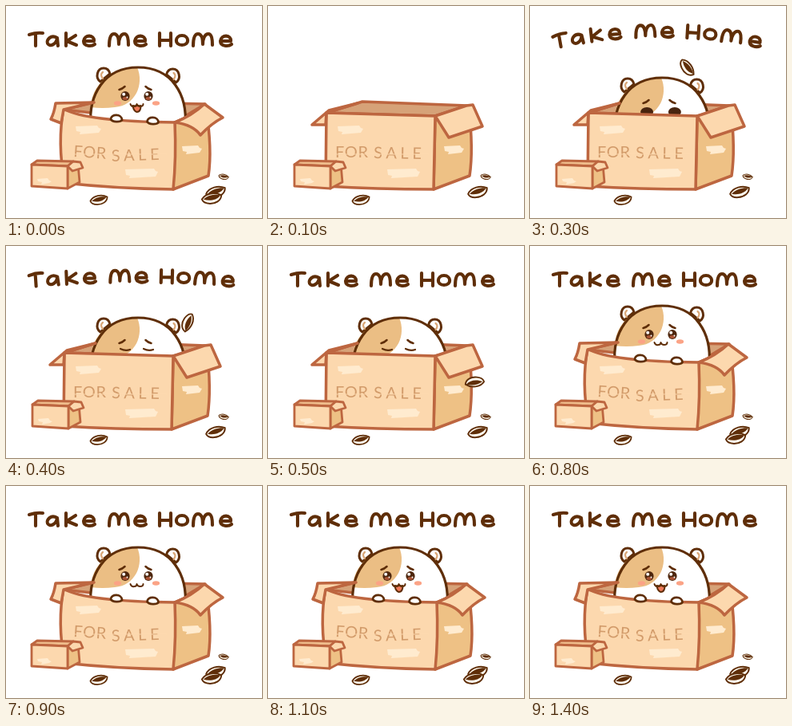
Write an HTML page that moves like this. It is 320 px wide and 266 px high and loops after 2 s.

```html
<!DOCTYPE html>
<html lang="en">
<head>
<meta charset="utf-8">
<title>Take Me Home</title>
<style>
html, body { margin: 0; width: 100%; height: 100%; overflow: hidden; background: #fff; }
svg { display: block; width: 100vw; height: 100vh; }
.sign { font: 400 20px Lato, sans-serif; fill: #d29b6a; }
.near { letter-spacing: .6px; }
.far { letter-spacing: 4.6px; }
</style>
</head>
<body>
<svg id="stage" viewBox="0 0 320 266" role="img" aria-label="Take Me Home" stroke-linecap="round" stroke-linejoin="round"></svg>
<script>
const stage = document.getElementById('stage');
const INK = '#5f2e08', EDGE = '#bd6640', CARD = '#fcd8ae', SHADE = '#eec185', INSIDE = '#d6a278', PALE = '#ffebcf';

const path = (d, fill, stroke = 'none', width = 0) =>
  `<path d="${d}" fill="${fill}" stroke="${stroke}" stroke-width="${width}"/>`;
const ellipse = (x, y, rx, ry, fill) => `<ellipse cx="${x}" cy="${y}" rx="${rx}" ry="${ry}" fill="${fill}"/>`;
const line = (d, color, width) => path(d, 'none', color, width);
const group = (transform, content) => `<g transform="${transform}">${content}</g>`;
const card = (d, fill = CARD, width = 3.5) => path(d + 'Z', fill, EDGE, width);

// Hand lettering, each glyph centred on its own origin
const glyphs = {
  T: 'M-9-6Q0-9 8-8M-1-7V8',
  a: 'M6-2C-2-7-8 1-6 5C-3 10 5 6 6-2L7 8',
  k: 'M-6-8V8M6-5L-5 2L7 7',
  e: 'M-6 2H6C7-6-6-7-7 2C-7 9 3 9 7 6',
  m: 'M-12 8C-12-4-9-7-6-7C-1-7 0 0 0 6C0 0 2-7 7-7C11-7 12 0 12 7',
  H: 'M-7-8V8M7-8V8M-7 1H7',
  o: 'M0-5C-9-5-10 7 0 7C10 7 9-5 0-5Z'
};
const lettering = [...'TakemeHome'];
const letterX = [38, 58, 81, 104, 141, 168, 199, 220, 246, 275];

function title(arch) {
  return lettering.map((c, i) => {
    const x = letterX[i], u = (x - 157) / 118;
    const px = x + arch * (x - 28) * .028;
    const py = 42 + arch * (-11 + 12 * u * u);
    return group(`translate(${px} ${py}) rotate(${arch * u * 10})`, line(glyphs[c], INK, 4.1));
  }).join('');
}

function seed(x, y, angle, size = 1) {
  return group(`translate(${x} ${y}) rotate(${angle}) scale(${size})`,
    path('M-12 2C-8-6 4-8 12-4C12 3 5 7-2 7C-7 7-11 5-12 2Z', '#fffaf0', INK, 2) +
    path('M-10 2C-4-4 4-5 11-4C6 3-3 4-10 2Z', INK));
}

const tape = (x, y, w, h) => path(
  `M${x} ${y + 1}L${x + w - 5} ${y}L${x + w - 3} ${y + 3}L${x + w} ${y + 4}L${x + w - 3} ${y + h - 2}` +
  `L${x + 5} ${y + h}L${x + 6} ${y + h - 3}L${x + 1} ${y + h - 4}Z`, PALE);

function smallBox(low) {
  return group(`translate(${low ? -1 : 0} 0)`,
    card('M33 199L40 194L85 195L78 201', '#efbd8c', 2.8) +
    card('M78 201L91 198L93 221L78 229', SHADE, 2.8) +
    card('M33 199L78 201V229L33 226', CARD, 2.8) +
    card('M78 201L85 195L94 196L97 203L84 207', CARD, 2.8) + tape(40, 216, 18, 8));
}

function boxBack(low) {
  return low ? card('M72 130L112 120L249 123L211 146', INSIDE)
             : card('M73 134L118 120L249 125L209 138', INSIDE);
}

function sign(low) {
  const word = (transform, name, text) => group(transform, `<text class="sign ${name}">${text}</text>`);
  return (low ? word('translate(84 189) rotate(4)', 'near', 'FOR') + word('translate(132 195) rotate(-2)', 'far', 'SALE')
              : word('translate(84 190)', 'near', 'FOR') + word('translate(132 191) rotate(1)', 'far', 'SALE')) +
    line('M84 186H200', CARD, 1);
}

function boxFront(low) {
  const faces = low
    ? card('M211 146L250 128Q258 180 253 213L209 230', SHADE) +
      card('M72 129Q100 145 211 146Q213 190 209 230Q135 229 73 222Q64 170 72 129') +
      card('M211 146Q232 138 248 123L271 140Q257 147 243 162Q234 149 211 146') +
      card('M72 130L110 121L62 122Q60 135 56 142L69 147')
    : card('M209 138L251 128Q257 180 252 213L207 230', SHADE) +
      card('M73 134L209 138L207 230Q135 230 72 226') +
      card('M209 138L248 125L256 124L268 151L226 165') + card('M73 134L112 122L76 131L55 149L72 149');
  return faces + tape(87, 150, 32, 11) + tape(149, 204, 41, 12) + tape(220, 175, 25, 11) + sign(low);
}

function eyes(look) {
  return [-14.5, 14.5].map(x => {
    if (look === 'shut') return line(`M${x - 6}-1Q${x} 2 ${x + 6} 0`, INK, 2.2);
    if (look === 'dark') return ellipse(x * 1.2, 3, 8, 6, '#48240f');
    return ellipse(x, 0, 5.6, 6, '#4d260d') + ellipse(x, 3, 3.4, 1.9, '#a95435') +
      ellipse(x - 1.8, -2.3, 2, 2, '#fff') + ellipse(x + 2.5, 1.5, 1, 1, '#fff');
  }).join('');
}

function face(look, mouth) {
  const smile = line('M-8 10Q-7 14-3 13Q0 13 0 10Q1 13 4 13Q8 13 8 10', INK, 2);
  const open = path('M-5 12Q0 13 0 11Q2 13 5 12Q5 20 0 20Q-4 19-5 12Z', '#ee7b5a', INK, 2);
  return line('M-22-8Q-18-9-15-12M11-12Q14-9 18-8', INK, 2.5) + eyes(look) +
    ellipse(-24, 9, 4.6, 2.8, '#fba386') + ellipse(24, 9, 4.6, 2.8, '#fba386') +
    (mouth ? (mouth === 'open' ? open : '') + smile : '');
}

function hamster({ drop, faceY, look, mouth }) {
  const ear = (x, y, s) => group(`translate(${x} ${y}) scale(${s} 1)`,
    path('M-3 9C-10 4-7-8 1-8C6-8 8-5 9-1Z', '#fff', INK, 3) + line('M0 5Q-4 0 0-3', '#d9a676', 2.2));
  const head = 'M106 150C103 112 122 77 165 77C208 77 227 112 224 150Z';
  return group(`translate(0 ${drop})`, ear(121, 86, 1) + ear(209.5, 87, -1) + path(head, '#fff') +
    path('M106 127C107 101 128 78 164 77C173 98 162 125 136 127Q120 129 106 127Z', '#ebbe84') +
    line(head, INK, 3.2)) + group(`translate(163.5 ${faceY})`, face(look, mouth));
}

const paw = (x, y) => path(
  `M${x - 7} ${y + 1}C${x - 7} ${y - 6} ${x + 7} ${y - 6} ${x + 7} ${y + 2}C${x + 5} ${y + 5} ${x - 5} ${y + 5} ${x - 7} ${y + 1}Z`,
  '#fff', INK, 2.8);

function pose(step) {
  if (step >= 2 && step <= 7) {
    const drop = step === 2 ? 28 : 13;
    return { drop, faceY: drop + 117, look: step < 4 ? 'dark' : step < 6 ? 'shut' : 'open' };
  }
  const drop = step === 8 ? -2 : 0;
  return { drop, faceY: 113 + drop, look: 'open', mouth: step >= 8 && step <= 10 ? 'smile' : 'open' };
}

function draw(step) {
  const low = step === 0 || step >= 7;
  const arch = { 2: 1.4, 3: 1, 4: .4 }[step] || 0;
  let out = step === 1 ? '' : title(arch);
  out += boxBack(low);
  if (step !== 1) out += hamster(pose(step));
  out += boxFront(low) + (low ? paw(138, 141) + paw(183.5, 144) : '') + smallBox(low);
  out += seed(116, 243, 0, .88) + seed(272, 214, 24, .5) + seed(262, 233, -4);
  if (low) out += seed(257, 241, 2);
  else if (step === 6) out += seed(259, 226, 20);
  else if (step > 1) {
    const d = step - 3;
    out += seed(196.5 + 31 * d, 77 - 9 * d + 28 * d * d, 66 + 60 * d, .95);
  }
  stage.innerHTML = out;
}

let shown = -1;
function tick() {
  const step = Math.min(14, Math.floor(performance.now() % 2000 / 100));
  if (step !== shown) draw(shown = step);
  requestAnimationFrame(tick);
}
tick();
</script>
</body>
</html>
```
